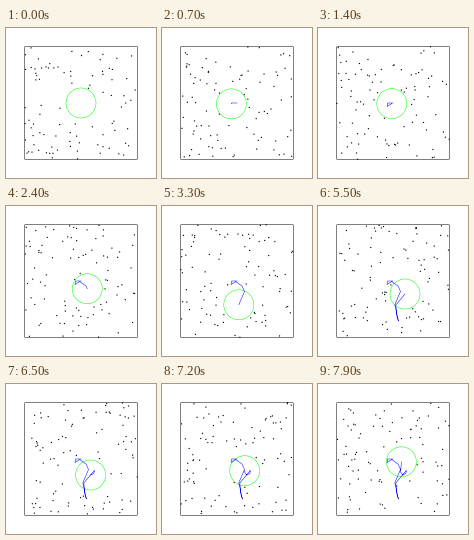
Recreate the animation shown at these times as a matplotlib script. Size 150x150 px, loop 8 s.

```python
import numpy as np
import matplotlib.pyplot as plt
from matplotlib.animation import FuncAnimation
from matplotlib.patches import Circle, Rectangle

SIZE, FRAMES, STEP = 150, 80, 100
LOW, HIGH = SIZE / 8, SIZE * 7 / 8
RADIUS, COUNT = 15, 90
PX = 0.72  # one pixel in points at 100 dpi
THIN = 0.5 * PX

# Main turns of the disc's walk: step, x, y
TURNS = [
    (0, 75, 75), (6, 69.5, 75), (10, 69, 78.5), (14, 73.8, 75.6),
    (22, 80, 80), (26, 82.5, 85.5), (33, 76.8, 98.8), (42, 80.4, 115),
    (44, 78.9, 110.3), (49, 77.8, 99), (55, 87, 88), (57, 88.4, 86.2),
    (60, 87.8, 89.5), (65, 84.6, 91), (71, 82.6, 88), (79, 83.4, 77.8),
]


def walk():
    t, x, y = np.transpose(TURNS)
    steps = np.arange(FRAMES)
    return np.column_stack([np.interp(steps, t, x), np.interp(steps, t, y)])


def simulate(path, sub=4):
    """Gas particles bouncing off the walls and the moving disc."""
    rng = np.random.default_rng(12)
    pos = rng.uniform(LOW, HIGH, (COUNT * 3, 2))
    pos = pos[np.hypot(*(pos - path[0]).T) > RADIUS + 1][:COUNT]
    angle = rng.uniform(0, 2 * np.pi, COUNT)
    speed = rng.uniform(1.5, 4, COUNT)
    vel = np.column_stack([np.cos(angle), np.sin(angle)]) * speed[:, None]
    track = [pos.copy()]
    for a, b in zip(path[:-1], path[1:]):
        for s in range(1, sub + 1):
            pos += vel / sub
            vel = np.where(pos < LOW, abs(vel), vel)
            vel = np.where(pos > HIGH, -abs(vel), vel)
            pos = np.clip(pos, LOW, HIGH)
            center = a + (b - a) * s / sub
            gap = pos - center
            dist = np.hypot(*gap.T)
            hit = dist < RADIUS
            normal = gap[hit] / dist[hit][:, None]
            into = ((vel[hit] - (b - a)) * normal).sum(axis=1)
            vel[hit] -= 2 * np.minimum(into, 0)[:, None] * normal
            pos[hit] = center + normal * RADIUS
        track.append(pos.copy())
    return track


disc_path = walk()
gas_path = simulate(disc_path)

fig = plt.figure(figsize=(SIZE / 100, SIZE / 100), dpi=100, facecolor="white")
ax = fig.add_axes([0, 0, 1, 1])
ax.set_xlim(0, SIZE)
ax.set_ylim(SIZE, 0)
ax.axis("off")

ax.add_patch(Rectangle((LOW, LOW), HIGH - LOW, HIGH - LOW, fill=False,
                       ec="black", lw=THIN, snap=False))
# One size per dot keeps positions between whole pixels
gas = ax.scatter(*gas_path[0].T, s=np.full(COUNT, (1.3 * PX) ** 2),
                 c="black", linewidths=0, clip_on=False, snap=False)
trail, = ax.plot([], [], color="blue", lw=THIN, snap=False)
disc = ax.add_patch(Circle(disc_path[0], RADIUS, fill=False, ec="lime",
                           lw=THIN, snap=False))


def draw(i):
    gas.set_offsets(gas_path[i])
    trail.set_data(*disc_path[:i + 1].T)
    disc.center = disc_path[i]
    return gas, trail, disc


anim = FuncAnimation(fig, draw, frames=FRAMES, interval=STEP, repeat=True,
                     repeat_delay=0)
plt.show()
```
